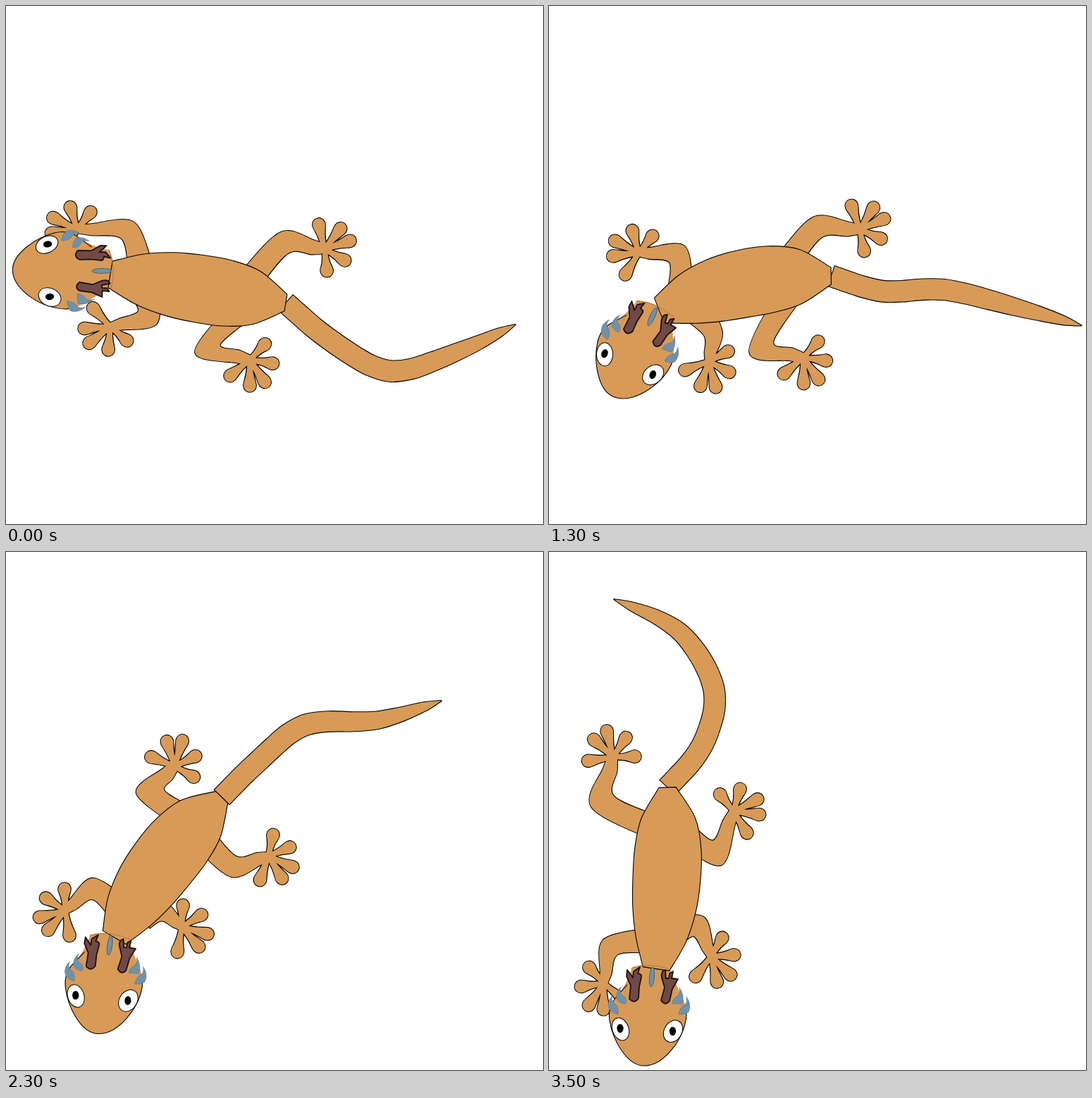
These frames come from a looping animation (762x735 px, 3600 ms). An HTML page:

```html
<!DOCTYPE html>
<html lang="en">
<head>
<meta charset="utf-8">
<title>Walking gecko</title>
<style>
  html, body { margin: 0; width: 100%; height: 100%; overflow: hidden; background: #fff; }
  svg { display: block; width: 100vw; height: 100vh; }
  .skin { fill: #d89a57; }
  .edge { fill: none; stroke: #000; stroke-width: 2.1; stroke-linejoin: round; }
  .line { stroke: #000; stroke-width: 1.1; stroke-linejoin: round; }
  .eye { fill: #fff; stroke: #000; stroke-width: 1; }
  .antler { fill: #704a45; stroke: #1d1010; stroke-width: 1.8; stroke-linejoin: round; }
  .frill { fill: #6f92aa; stroke: #55788f; stroke-width: .6; }
</style>
</head>
<body>
<svg viewBox="0 0 762 735">
  <path id="tail" class="skin line"/>
  <g id="limbs"></g>
  <g class="head">
    <path class="skin" d="M120 588Q146 580 174 592Q182 612 190 628Q198 645 197 657C194 690 165 728 137 728C112 728 92 690 88 664Q85 645 97 631Q112 615 120 588Z"/>
    <path class="line" fill="none" d="M196 648Q197 652 197 657C194 690 165 728 137 728C112 728 92 690 88 664Q85 645 97 631L113 613"/>
    <ellipse class="eye" rx="11.5" ry="16.5" transform="translate(103.5 676) rotate(-20)"/>
    <ellipse class="eye" rx="12.5" ry="16.5" transform="translate(178 679) rotate(30)"/>
    <ellipse cx="103" cy="675" rx="4.6" ry="6.2"/>
    <ellipse cx="177.5" cy="679" rx="4.6" ry="6.2"/>
  </g>
  <path id="body" class="skin line"/>
  <g class="head">
    <path fill="none" stroke="#a87338" stroke-width=".8" d="M118 590Q146 580 176 592"/>
    <path class="antler" d="M116 633L118 614L112 601L113 592Q118 598 121 603L122 594L131 588L128 597Q134 598 133 602L130 616L129 632Q123 641 116 633Z"/>
    <path class="antler" d="M161 635L166 617L162 603Q160 594 167 592L168 604L172 604L173 597L178 594L176 604L185 605L177 619L173 636Q167 644 161 635Z"/>
    <ellipse class="frill" rx="3.5" ry="14" transform="translate(148 602) rotate(5)" style="stroke:#2c3f4c"/>
    <path class="frill" d="M92 628Q84 637 87 646Q90 653 100 655Q101 645 96 640Q89 638 92 628ZM104 616Q95 626 99 635Q104 640 111 640Q113 633 108 629Q101 627 104 616ZM187 617Q195 629 191 640L177 640Q178 632 184 629Q189 626 187 617ZM197 630Q205 641 200 652Q193 656 186 655Q188 645 193 642Q199 640 197 630Z"/>
  </g>
</svg>
<script>
const LOOP = 3600, STEP = 100;

// Skeleton poses. head: x, y, turn; tail: hip to tip; legs: knee and hand of each leg.
const POSES = [
  { t: 0, head: [60.5, 375, 84.6], tail: [397,421, 463,476, 545,518, 637,492, 723,452],
    legs: [172,318, 101,317, 200,443, 148,455, 395,336, 452,345, 286,486, 346,502] },
  { t: 900, head: [92, 468.5, 38.1], tail: [404,398, 478,430, 565,444, 662,458, 762,472],
    legs: [182,334, 125,331, 224,456, 200,490, 394,326, 452,335, 296,487, 357,499] },
  { t: 1600, head: [127, 539.5, 10.2], tail: [391,370, 462,380, 547,365, 646,390, 739,418],
    legs: [175,373, 123,375, 238,475, 245,514, 359,303, 419,300, 305,480, 364,498] },
  { t: 2000, head: [130.5, 593, 6.2], tail: [354,350, 422,325, 498,293, 595,299, 683,294],
    legs: [141,424, 96,443, 235,492, 257,524, 284,287, 335,272, 307,472, 371,494] },
  { t: 2600, head: [140, 665, 0], tail: [258,348, 298,274, 354,207, 452,182, 533,131],
    legs: [107,526, 77,567, 214,527, 240,541, 133,393, 152,338, 332,422, 365,370] },
  { t: 3100, head: [140, 677, 0], tail: [205,340, 246,272, 284,192, 320,98, 308,1],
    legs: [94,550, 78,597, 214,530, 237,559, 90,383, 103,325, 286,419, 308,360] },
  { t: 3500, head: [138, 678, 0], tail: [168,334, 217,275, 234,195, 184,112, 92,67],
    legs: [87,561, 78,612, 213,532, 230,574, 76,354, 91,291, 238,427, 262,368] }
];

// side: flank; root: place along the spine; wrist: angle between forearm and hand.
const LEGS = [
  { side: -1, root: .15, wrist: 80, widths: [17, 12, 8, 5] },
  { side: 1, root: .22, wrist: 80, widths: [20, 12, 8, 5] },
  { side: -1, root: .78, wrist: 28, widths: [17, 14, 10, 6] },
  { side: 1, root: .75, wrist: 14, widths: [17, 13, 9, 6] }
];
const FINGERS = [[-47, 40], [8, 42], [55, 47], [89, 46], [140, 45]]; // angle, length
const BODY_WIDTHS = [19, 36, 45, 48, 47, 38, 12];
const TAIL_SAMPLES = 12;

const byId = id => document.getElementById(id);
const heads = document.querySelectorAll('.head');
const fmt = p => p[0].toFixed(2) + ' ' + p[1].toFixed(2);
const mix = (p, q, s) => [p[0] + (q[0] - p[0]) * s, p[1] + (q[1] - p[1]) * s];
const unit = (p, q) => {
  const dx = q[0] - p[0], dy = q[1] - p[1], len = Math.hypot(dx, dy) || 1;
  return [dx / len, dy / len];
};
function spin([x, y], degrees) {
  const a = degrees * Math.PI / 180, c = Math.cos(a), s = Math.sin(a);
  return [x * c - y * s, x * s + y * c];
}
function pairs(list) {
  const points = [];
  for (let i = 0; i < list.length; i += 2) points.push([list[i], list[i + 1]]);
  return points;
}

// Cubic Hermite blend between the poses around time t.
function sample(part, t) {
  const last = POSES.length - 1;
  let k = 0;
  while (k < last - 1 && t >= POSES[k + 1].t) k++;
  const from = POSES[k], to = POSES[k + 1];
  const span = to.t - from.t, s = (t - from.t) / span, ease = s * s * (3 - 2 * s);
  const slope = (n, i) => {
    const a = POSES[Math.max(n - 1, 0)], b = POSES[Math.min(n + 1, last)];
    return (b[part][i] - a[part][i]) / (b.t - a.t);
  };
  return from[part].map((v, i) => v + (to[part][i] - v) * ease
    + span * s * (1 - s) * ((1 - s) * slope(k, i) - s * slope(k + 1, i)));
}

// Bezier controls of a Catmull-Rom segment starting at point i.
function segment(points, i) {
  const at = n => points[Math.max(0, Math.min(points.length - 1, n))];
  const [o, p, q, r] = [at(i - 1), at(i), at(i + 1), at(i + 2)];
  return [p, [p[0] + (q[0] - o[0]) / 6, p[1] + (q[1] - o[1]) / 6],
    [q[0] - (r[0] - p[0]) / 6, q[1] - (r[1] - p[1]) / 6], q];
}

function curve(points) {
  return fmt(points[0]) + points.slice(1).map((_, i) =>
    'C' + segment(points, i).slice(1).map(fmt).join(' ')).join('');
}

function along(points, u) {
  const x = u * (points.length - 1), i = Math.min(Math.floor(x), points.length - 2);
  let c = segment(points, i);
  while (c.length > 1) c = c.slice(1).map((p, n) => mix(c[n], p, x - i));
  return c[0];
}

// Closed band around a centre line with a half width at each point.
function ribbon(points, widths) {
  const edge = sign => points.map((p, i) => {
    const into = unit(points[Math.max(i - 1, 0)], points[Math.max(i, 1)]);
    const out = i < points.length - 1 ? unit(p, points[i + 1]) : into;
    const [dx, dy] = unit([0, 0], [into[0] + out[0], into[1] + out[1]]);
    const miter = Math.max(.7, dx * out[0] + dy * out[1]);
    const w = sign * widths[i] / miter;
    return [p[0] - dy * w, p[1] + dx * w];
  });
  return `M${curve(edge(1))}L${curve(edge(-1).reverse())}Z`;
}

function handPath([x, y], turn, side) {
  return FINGERS.map(([angle, len]) => {
    const at = (u, v) => {
      const [dx, dy] = spin([u, v], turn + side * angle);
      return fmt([x + dx, y + dy]);
    };
    const w = 8.8, r = len - 10;
    return `M${at(-2, -4)}C${at(20, -2.5)} ${at(r - 5, -w)} ${at(r, -w)}`
      + `C${at(len + 3, -w)} ${at(len + 3, w)} ${at(r, w)}`
      + `C${at(r - 5, w)} ${at(20, 2.5)} ${at(-2, 4)}Z`;
  }).join('');
}

function addPath(className) {
  const path = document.createElementNS('http://www.w3.org/2000/svg', 'path');
  path.setAttribute('class', className);
  byId('limbs').append(path);
  return path;
}
for (const leg of LEGS) leg.paths = ['edge', 'skin', 'skin'].map(addPath);

function draw(t) {
  const [x, y, turn] = sample('head', t);
  for (const g of heads) g.setAttribute('transform', `translate(${x} ${y}) rotate(${turn}) translate(-140 -677)`);

  // The spine runs from the back of the head to the hip and sways sideways.
  const tail = pairs(sample('tail', t)), hip = tail[0];
  const [nx, ny] = spin([14, -86.5], turn), neck = [x + nx, y + ny];
  const [dx, dy] = unit(neck, hip);
  const sway = 14 * Math.sin(Math.PI * t / 3000);
  const spine = (u, side = 0) => {
    const p = mix(neck, hip, u), off = side - sway * 4 * u * (1 - u);
    return [p[0] - dy * off, p[1] + dx * off];
  };
  const body = BODY_WIDTHS.map((_, i) => spine(i / (BODY_WIDTHS.length - 1)));
  byId('body').setAttribute('d', ribbon(body, BODY_WIDTHS));

  const steps = Array.from({ length: TAIL_SAMPLES + 1 }, (_, i) => i / TAIL_SAMPLES);
  byId('tail').setAttribute('d', ribbon(steps.map(u => along(tail, u)), steps.map(u => 14.8 * (1 - u ** 6) + .5)));

  const joints = pairs(sample('legs', t));
  LEGS.forEach(({ side, root, wrist, widths, paths }, i) => {
    const knee = joints[2 * i], hand = joints[2 * i + 1];
    const arm = ribbon([spine(root, side * 24), knee, mix(knee, hand, .72), hand], widths);
    const forearm = Math.atan2(hand[1] - knee[1], hand[0] - knee[0]) * 180 / Math.PI;
    const palm = handPath(hand, forearm - side * wrist, side);
    [arm + palm, arm, palm].forEach((d, n) => paths[n].setAttribute('d', d));
  });
}

const start = performance.now();
function tick() {
  const t = (performance.now() - start) % LOOP;
  draw(Math.floor(t / STEP) * STEP);
  requestAnimationFrame(tick);
}
tick();
</script>
</body>
</html>
```
